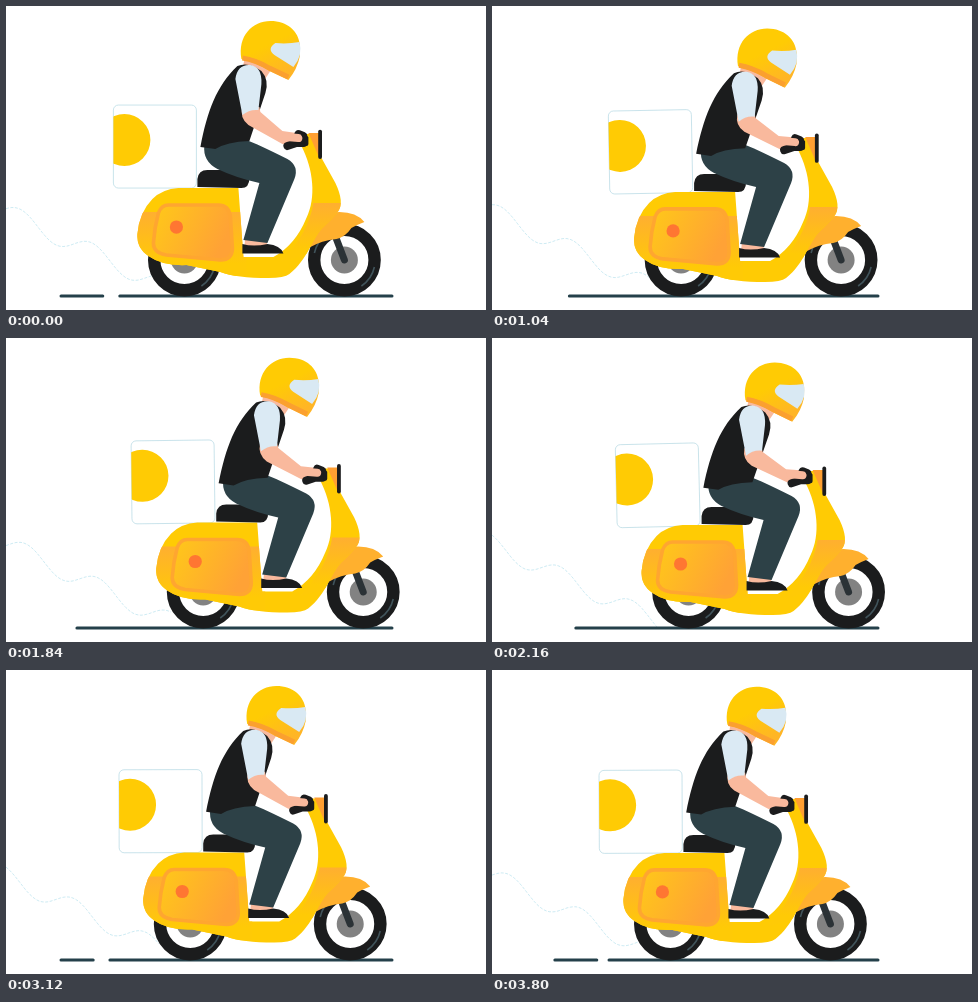
Animation of 480 by 304 pixels, one loop 3.84 s. Source, as an HTML page:

```html
<!DOCTYPE html>
<html lang="en">
<head>
<meta charset="utf-8">
<title>Scooter delivery</title>
<style>
  html, body { margin: 0; width: 100%; height: 100%; overflow: hidden; background: #fff; }
  svg { display: block; width: 480px; height: 304px; }
</style>
</head>
<body>
<svg viewBox="0 0 480 304" fill="none">
  <defs>
    <linearGradient id="panelFill" x1="0" x2="1" y1="0" y2=".35">
      <stop offset=".1" stop-color="#ffc51b"/><stop offset="1" stop-color="#ffa236"/>
    </linearGradient>
    <linearGradient id="shade" x1="0" x2="0" y1="0" y2="1">
      <stop offset="0" stop-color="#ffaf30"/><stop offset=".8" stop-color="#ffca06"/>
    </linearGradient>
    <linearGradient id="helmetFill" x1="0" x2=".5" y1="0" y2="1">
      <stop offset=".5" stop-color="#ffcb04"/><stop offset="1" stop-color="#ffb526"/>
    </linearGradient>
    <path id="shell" d="M294 128H308L314 150L329 177Q338 196 332 205Q327 212 316 222C306 232 301 254 283 268Q278 272 262 272Q230 272 214 266L180 259Q156 260 142 250Q130 242 131 228Q133 206 146 193Q156 183 172 182H232L237 251H267Q289 239 300 212C310 192 307 163 295 140Z"/>
    <clipPath id="shellClip"><use href="#shell"/></clipPath>
    <clipPath id="boxClip"><rect x="107" y="99" width="83" height="83" rx="5"/></clipPath>
    <g id="wheel">
      <circle r="30.2" fill="#fff" stroke="#1b1c1d" stroke-width="12.4"/>
      <circle r="13.5" fill="#828282"/>
      <path d="M-30-7A31 31 0 0 1-17-26M30 7A31 31 0 0 1 17 26" stroke="#40535a" stroke-width="1.6"/>
    </g>
  </defs>

  <path id="trail" stroke="#b9e2ee" stroke-width=".7" stroke-dasharray="3 1.5"/>
  <path id="ground" stroke="#24404a" stroke-width="3" stroke-linecap="round"/>

  <g id="scooter">
    <use href="#wheel" x="178" y="254"/>
    <use href="#wheel" x="338" y="254"/>
    <path d="M330 233L338 254" stroke="#2b3236" stroke-width="7" stroke-linecap="round"/>

    <g id="box">
      <rect x="107" y="99" width="83" height="83" rx="5" fill="#fff" stroke="#bcdde6" stroke-width=".8"/>
      <circle cx="118" cy="134" r="26" fill="#ffcb04" clip-path="url(#boxClip)"/>
    </g>

    <g id="body">
      <path d="M300 238C302 220 314 206 333 206Q350 206 358 216Q350 219 345 222Q339 231 330 233Q316 234 302 242Z" fill="#ffb02e"/>
      <use href="#shell" fill="#ffcb04"/>
      <g clip-path="url(#shellClip)" fill="url(#shade)">
        <path d="M125 206H240V270H125Z"/>
        <path d="M307 197H340V236L274 256Q302 228 307 197Z"/>
      </g>
      <path d="M162 199H212Q222 199 224 210L226 242Q226 254 214 254L160 249Q147 247 147 237Q148 222 152 207Q155 199 162 199Z" fill="url(#panelFill)" stroke="#ffa630" stroke-width="3.6"/>
      <circle cx="170" cy="221" r="6.6" fill="#ff7632"/>
      <path d="M302 127H313V152Z" fill="#ff9f32"/>
      <path d="M313.7 125.5V151" stroke="#1b1c1d" stroke-width="3.8" stroke-linecap="round"/>
      <path d="M191 181V173Q192 164 201 164H222Q228 170 243 172Q243 182 235 182Z" fill="#1b1c1d"/>

      <path d="M239 231H262L260 240H238Z" fill="#f9b99d"/>
      <path d="M236 247.5V238Q247 241 261 238Q274 239 277 247.5Z" fill="#1b1c1d"/>
      <path d="M198 139L240 134Q251 138 281 153Q293 160 288 173L261 237L237 234L253 177Q230 172 211 163Q196 155 198 139Z" fill="#2d4147"/>
    </g>

    <g id="torso">
      <path d="M239 48L266 62L258 74L236 64Z" fill="#f9b99d"/>
      <path d="M231 60Q242 55 255 65Q263 74 259 87L243 135Q220 136 209 143L194 141C201 105 210 80 231 60Z" fill="#1b1c1d"/>
      <path d="M235 53C231 30 246 15 264 15C281 15 292 25 293.5 39V50Q291 63 282 74L263 65Q249 56 235 53Z" fill="url(#helmetFill)"/>
      <path d="M236 52Q249 54 263 62L282 71" stroke="#fba02f" stroke-width="5"/>
      <path d="M269 37Q282 38 293 36Q297 49 287 61L268 49Q260 43 269 37Z" fill="#d9e9f3"/>
    </g>

    <g id="forearm">
      <path d="M236 101H253L254 106L276 125L290 127Q296 132 289 138H276L242 119Q233 112 236 101Z" fill="#f9b99d"/>
    </g>
    <g id="sleeve">
      <path d="M229 73Q231 58 244 59Q256 61 255 78L252 104Q243 103 236 109Z" fill="#dbeaf4"/>
    </g>
    <g id="grip">
      <path d="M281 140L290 137H297V130L292 128" stroke="#1b1c1d" stroke-width="8" stroke-linecap="round" stroke-linejoin="round"/>
      <path d="M280 131L292 132" stroke="#f9b99d" stroke-width="8" stroke-linecap="round"/>
      <path d="M297 129L300 132V138" stroke="#1b1c1d" stroke-width="4" stroke-linecap="round"/>
    </g>
  </g>
</svg>
<script>
const LOOP = 3840, BOB = 384, TAU = Math.PI * 2;
const el = id => document.getElementById(id);
const swing = phase => (1 - Math.cos(TAU * phase)) / 2;
const move = (id, x, y, turn = '') => el(id).setAttribute('transform', `translate(${x} ${y}) ${turn}`);

// Piecewise linear track through [time, value] pairs
function track(points, t) {
  const i = Math.max(1, points.findIndex(p => p[0] >= t));
  const [a, b] = [points[i - 1], points[i]];
  return a[1] + (b[1] - a[1]) * (t - a[0]) / (b[0] - a[0]);
}

function trailPath(t, drift) {
  const step = 32 - t * 288 / LOOP;
  let d = '';
  for (let x = 0; x <= 148 + drift; x += 3) {
    const y = 206 + .47 * x + 9.5 * Math.sin(TAU * (x - step) / 72);
    d += `${d ? 'L' : 'M'}${x} ${Math.min(y, 289).toFixed(1)}`;
  }
  return d;
}

// A dash breaks off the ground line and runs out at its left end
function groundPath(t) {
  const left = 55, p = t % BOB;
  const edge = track([[0, 114], [48, 104], [216, 89], [240, 84], [384, 55]], p);
  const fresh = p > 310;
  const age = fresh ? p - BOB : p;
  const tail = 97 - .2 * age;
  const main = fresh ? Math.min(117, 114 - .2 * age) : edge;
  let d = `M${main} 290H386`;
  const head = fresh ? edge : left;
  if (tail > head) d += `M${head} 290H${tail}`;
  return d;
}

function draw(now) {
  const t = now % LOOP;
  const drift = .4 + 18.9 * swing(t / LOOP);
  const dip = swing(t / BOB - .03);
  move('scooter', drift, 0);
  move('body', 0, 5.5 * dip);
  move('box', -1.5 * dip, 7.5 * dip, `rotate(${-1.5 * dip} 148 140)`);
  move('torso', 0, 10.5 * dip, `rotate(${.8 * dip} 264 44)`);
  move('sleeve', -.6 * dip, 9.5 * dip);
  move('forearm', 0, 6 * dip, `rotate(${-4.5 * dip} 288 133)`);
  move('grip', 0, 5.8 * dip);
  el('trail').setAttribute('d', trailPath(t, drift));
  el('ground').setAttribute('d', groundPath(t));
}

const start = performance.now();
function tick() {
  draw(performance.now() - start);
  requestAnimationFrame(tick);
}
tick();
</script>
</body>
</html>
```
